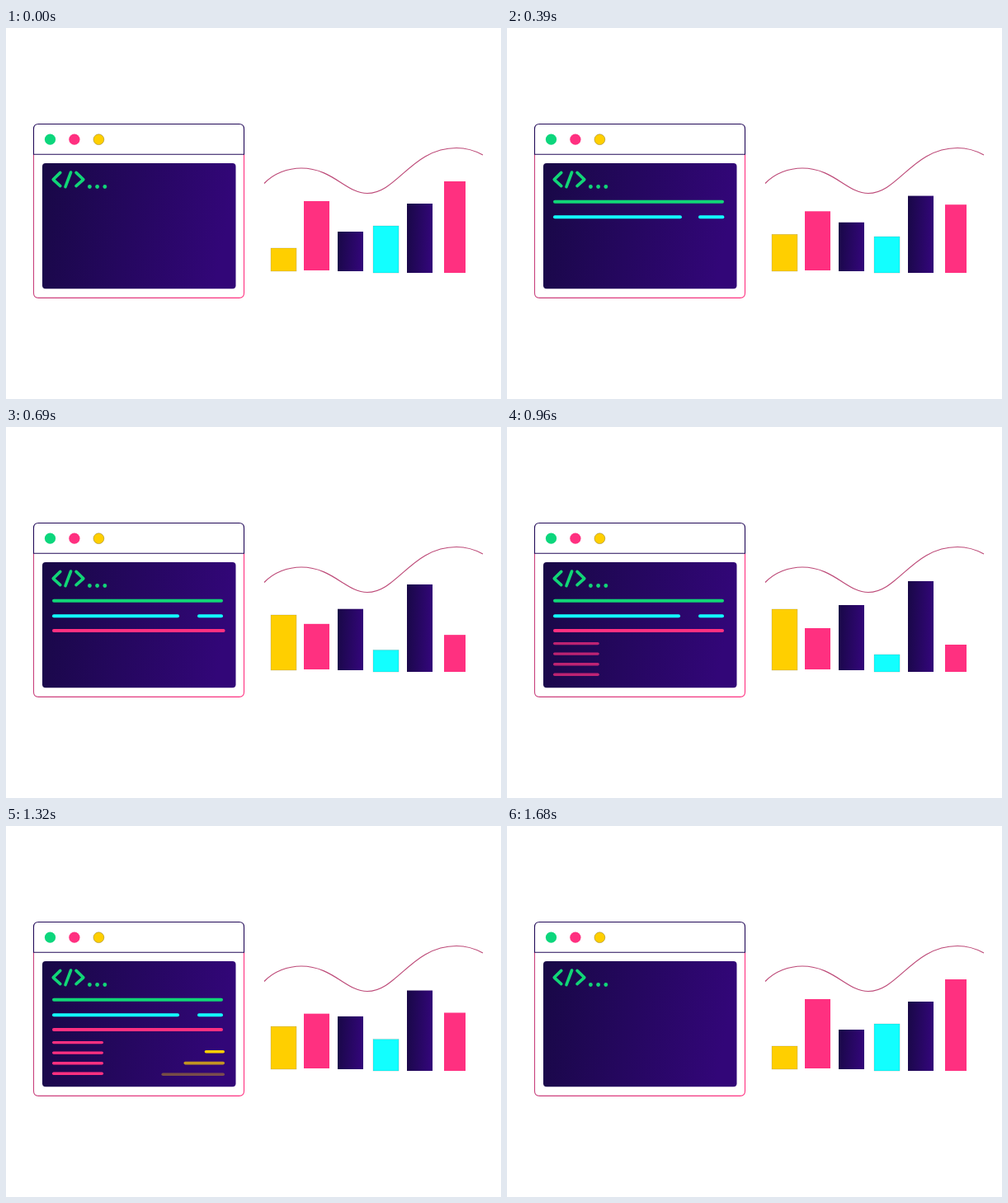
These frames come from a looping animation (600x450 px, 1.74 s). An HTML page:

```html
<!DOCTYPE html>
<html lang="en">
<head>
<meta charset="utf-8">
<title>Code and chart</title>
<style>
html, body { margin: 0; width: 100%; height: 100%; overflow: hidden; background: #fff; }
svg { display: block; width: 100%; height: 100%; }
</style>
</head>
<body>
<svg viewBox="0 0 600 450" fill="none">
  <defs>
    <linearGradient id="night" x1="0" y1="0" x2="1" y2=".12">
      <stop offset="0" stop-color="#180846"/>
      <stop offset="1" stop-color="#320678"/>
    </linearGradient>
    <linearGradient id="side" gradientUnits="userSpaceOnUse" x1="33" y1="0" x2="289" y2="0">
      <stop offset="0" stop-color="#c8407c"/>
      <stop offset="1" stop-color="#ff3080"/>
    </linearGradient>
  </defs>

  <path d="M33.5 153V321.5Q33.5 327.4 39.5 327.4H282.5Q288.5 327.4 288.5 321.5V153" stroke="url(#side)" stroke-width="1.1"/>
  <path d="M33.5 153.3V122.5Q33.5 116.5 39.5 116.5H282.5Q288.5 116.5 288.5 122.5V153.3Z" stroke="#220a58" stroke-width="1.1"/>
  <circle cx="53.5" cy="135.2" r="6.6" fill="#0cd67c"/>
  <circle cx="82.9" cy="135.2" r="6.6" fill="#ff3080"/>
  <circle cx="112.4" cy="135.2" r="6.4" fill="#ffcf00" stroke="#8a7420" stroke-width=".5"/>
  <rect x="44" y="164" width="234.5" height="152.3" rx="4" fill="url(#night)"/>

  <path d="M65.8 175.4L57.2 183.8L65.8 191.6M78.6 175L72 192.6M85 175.4L93.8 183.8L85 191.6"
    stroke="#11d677" stroke-width="3.6" stroke-linecap="round" stroke-linejoin="round"/>
  <g fill="#11d677">
    <circle cx="101.4" cy="192.5" r="2.4"/>
    <circle cx="110.6" cy="192.5" r="2.4"/>
    <circle cx="119.8" cy="192.5" r="2.4"/>
  </g>

  <g id="lines" stroke-linecap="round"></g>
  <g id="bars"></g>
  <path d="M313 188.5C325 176 342 170 358 170C396 170 412 200.5 438 200.5C474 200.5 492 145.5 546 145.5C558 145.5 569 149 578 154"
    stroke="#bd4a78" stroke-width="1.2"/>
</svg>
<script>
const LOOP = 1740, STEP = 30, CLEAR = 1680;
const GREEN = '#11d677', CYAN = '#12ffff', PINK = '#ff3080', GOLD = '#ffcf00', NIGHT = 'url(#night)';

// x, width, base, resting top, top at swing 1, fill
const bars = [
  [321, 31, 295, 267, 221, GOLD],
  [361, 31, 294, 210, 244, PINK],
  [402, 31, 295, 247, 216, NIGHT],
  [445, 31, 297, 240, 276, CYAN],
  [486, 31, 297, 213, 187, NIGHT],
  [531, 26, 297, 186, 264, PINK]
];

// anchored end, moving end, y, thickness, colour, start time
const lines = [
  [56, 263, 210.8, 4, GREEN, 120],
  [56, 210, 229.2, 4, CYAN, 210],
  [232, 263, 229.2, 4, CYAN, 210],
  [56, 263, 247, 4, PINK, 510],
  ...[262.6, 275.1, 287.7, 300.2].map(y => [56, 118, y, 3.4, PINK, 880]),
  [265, 241, 273.8, 3.6, GOLD, 1200],
  [265, 210, 287.6, 3.6, GOLD, 1240],
  [265, 136, 301.2, 3.6, GOLD, 1280]
];

const swingKeys = [[0, 0], [150, 0], [390, .362], [690, .848], [866, 1.13], [960, 1],
  [990, 1], [1170, .735], [1500, .26], [1680, 0], [1740, 0]];

function swing(t) {
  const i = swingKeys.findIndex(k => k[0] > t);
  const [t0, a] = swingKeys[i - 1], [t1, b] = swingKeys[i];
  return a + (b - a) * (t - t0) / (t1 - t0);
}

// Eases out with a small overshoot
function spring(u) {
  const s = .9, v = Math.min(u, 1) - 1;
  return 1 + (s + 1) * v ** 3 + s * v * v;
}

function make(tag, parent, attrs) {
  const el = document.createElementNS('http://www.w3.org/2000/svg', tag);
  set(el, attrs);
  return document.getElementById(parent).appendChild(el);
}

function set(el, attrs) {
  for (const key in attrs) el.setAttribute(key, attrs[key]);
}

const barEls = bars.map(([x, width, , , , fill]) => {
  const edged = fill === GOLD || fill === CYAN;
  return make('rect', 'bars', { x, width, fill, stroke: edged ? '#00000040' : 'none', 'stroke-width': .5 });
});
const lineEls = lines.map(([, , y, w, stroke]) =>
  make('line', 'lines', { y1: y, y2: y, stroke, 'stroke-width': w }));

function draw(t) {
  const p = swing(t);
  bars.forEach(([, , base, rest, far], i) => {
    const y = rest + (far - rest) * p;
    set(barEls[i], { y, height: base - y });
  });
  lines.forEach(([from, to, , w, , start], i) => {
    const u = (t - start) / 210;
    const shown = u > 0 && t < CLEAR;
    const cap = Math.sign(to - from) * w / 2;
    const x1 = from + cap;
    const x2 = x1 + (to - from - 2 * cap) * spring(Math.max(u, 0));
    set(lineEls[i], { x1, x2, opacity: shown ? Math.min(1, u * 1.85) : 0 });
  });
}

const begin = performance.now();
function tick() {
  const t = (performance.now() - begin) % LOOP;
  draw(Math.floor(t / STEP) * STEP);
  requestAnimationFrame(tick);
}
tick();
</script>
</body>
</html>
```
